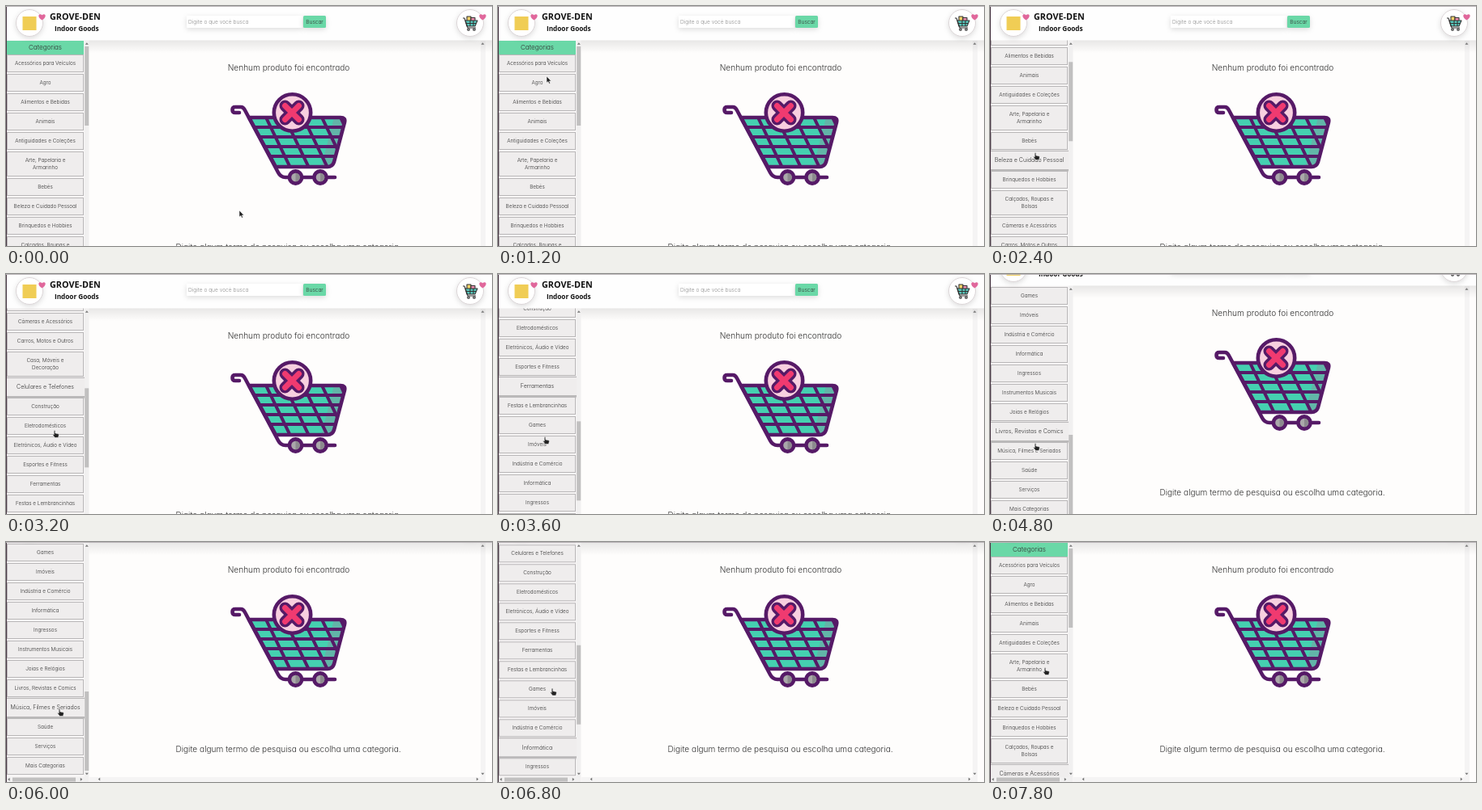
An HTML page that plays this animation: 600x297 px, repeating every 8000 ms.

```html
<!DOCTYPE html>
<html lang="pt-BR">
<head>
<meta charset="utf-8">
<title>Loja</title>
<style>
  html, body { margin: 0; width: 100%; height: 100%; overflow: hidden; background: #fefdfc; }
  svg { display: block; width: 600px; height: 297px; }
  text { font-family: Inter, "Open Sans", sans-serif; font-weight: 300; font-feature-settings: "cv11" 1; fill: #333; }
  .mid { text-anchor: middle; }
  .item text { font-size: 6.4px; }
  .item rect { fill: #efeded; stroke: #b9b7b8; }
  .item.hover rect { filter: drop-shadow(0 1px 1px #0005); }
  .brand { font-family: "Open Sans", "Noto Sans", sans-serif; font-weight: 700; fill: #111; }
  .track { fill: #f1f0f0; }
  .thumb { fill: #c1c0c0; }
  .arrow { fill: #777; }
  .ink { fill: none; stroke: #561a67; stroke-width: 4.6; stroke-linecap: round; stroke-linejoin: round; }
  #grid { stroke-width: 4; }
  .soft { filter: drop-shadow(0 2px 3px #0002); }
</style>
</head>
<body>
<svg viewBox="0 0 600 297" xmlns="http://www.w3.org/2000/svg">
  <defs>
    <path id="basket" d="M300 138H413Q419.500 138 418 144L405 193Q403 199 397 199H333Z"/>
    <clipPath id="sideClip"><rect y="42" width="97" height="291"/></clipPath>
    <clipPath id="basketClip"><use href="#basket"/></clipPath>
    <linearGradient id="shade" x2="0" y2="1">
      <stop stop-color="#000" stop-opacity=".09"/><stop offset="1" stop-color="#000" stop-opacity="0"/>
    </linearGradient>
    <path id="heart" d="M0 4.500C-7 0-4-5 0-1.800C4-5 7 0 0 4.500Z" fill="#e0679b"/>
    <g id="badge">
      <circle r="16.500" fill="#fff" stroke="#dcd6d8" class="soft"/>
      <use href="#heart" x="15.500" y="-8"/>
    </g>
    <path id="tri" class="arrow" d="M-2 1.200L0-1.300L2 1.200Z"/>
    <path id="cross" d="M344.500 123.500L361.500 140.500M361.500 123.500L344.500 140.500" fill="none" stroke-linecap="round"/>
  </defs>
  <rect width="600" height="297" fill="#fefdfc"/>
  <g id="page">
    <rect x="586" y="43" width="6" height="296" fill="#f5f4f4"/>
    <rect x="103" y="333" width="489" height="6" fill="#f5f4f4"/>
    <rect x="97" y="42" width="503" height="16" fill="url(#shade)"/>
    <use href="#tri" x="588.500" y="46.500"/>
    <use href="#tri" transform="translate(588.500 329) rotate(180)"/>
    <use href="#tri" transform="translate(115 335.500) rotate(-90)"/>
    <use href="#tri" transform="translate(582 335.500) rotate(90)"/>

    <text class="mid" x="349" y="79.500" font-size="10.100">Nenhum produto foi encontrado</text>
    <text class="mid" x="348.500" y="302" font-size="10.100">Digite algum termo de pesquisa ou escolha uma categoria.</text>

    <g id="cart">
      <use href="#basket" fill="#45d0b0"/>
      <g clip-path="url(#basketClip)">
        <path d="M405 138H420V200H389Z" fill="#62b5a8"/>
        <path id="grid" class="ink"/>
      </g>
      <use href="#basket" class="ink"/>
      <path class="ink" d="M288 132H283Q279.500 132 279.500 128.500T283 125H290Q293 125 295 129L336 206Q339 212 345 212H406"/>
      <g id="wheels"></g>
      <circle cx="353.500" cy="132" r="22.700" class="ink" style="fill:#f8cfdf"/>
      <use href="#cross" stroke="#561a67" stroke-width="14"/>
      <use href="#cross" stroke="#f03a70" stroke-width="7"/>
    </g>

    <rect width="97" y="42" height="297" fill="#f7f5f5"/>
    <g clip-path="url(#sideClip)"><g id="list">
      <rect x="1" y="43" width="95" height="17" fill="#6ad8a7"/>
      <text class="mid" x="48.500" y="54" font-size="8">Categorias</text>
    </g></g>
    <rect class="track" x="97" y="42" width="5.500" height="291"/>
    <rect class="thumb" id="thumb" x="97.200" y="50" width="5" height="98"/>
    <use href="#tri" x="99.800" y="46.500"/>
    <use href="#tri" transform="translate(99.800 329) rotate(180)"/>
    <rect class="track" y="333" width="102.500" height="6"/>
    <rect class="thumb" x="8" y="333.500" width="78" height="5"/>
    <use href="#tri" transform="translate(3.500 335.800) rotate(-90)"/>
    <use href="#tri" transform="translate(93 335.800) rotate(90)"/>

    <rect width="600" height="42.500" fill="#fefefe"/>
    <use href="#badge" x="29" y="21"/>
    <rect x="20.500" y="13" width="17" height="17" fill="#f0cd55"/>
    <text class="brand" x="54" y="17.300" font-size="10.800">GROVE-DEN</text>
    <text class="brand" x="60" y="30.700" font-size="8.200">Indoor Goods</text>
    <rect class="soft" x="223" y="12" width="143" height="15" rx="1" fill="#fff"/>
    <text x="225" y="22" font-size="6.600" style="fill:#8d8d8d">Digite o que você busca</text>
    <rect class="soft" x="367" y="12" width="28" height="15" rx="1.500" fill="#6ad8a7"/>
    <text class="mid" x="381" y="21.800" font-size="6.500">Buscar</text>
    <use href="#badge" x="573" y="21"/>
    <g fill="none" stroke="#333" stroke-width="1.100" stroke-linejoin="round">
      <path d="M569 18V13H574V18" fill="#f3d36a"/>
      <path d="M574 18V14.500H579V18" fill="#ee8fb0"/>
      <path d="M567 18H582L579 25H569Z" fill="#58c9bd"/>
      <path d="M564 15H566L570 27H580M568 21.500H580M573 18V25M577 18V25"/>
      <circle cx="571" cy="29" r="1.300" fill="#ddd"/><circle cx="578" cy="29" r="1.300" fill="#ddd"/>
    </g>
  </g>
  <rect width="600" height="1" fill="#b9b4b7"/>
  <rect y="1" width="1" height="296" fill="#4b3a47"/>
  <g id="pointer" stroke="#fff" stroke-width=".5" fill="#222">
    <path id="arrowShape" d="M0 0V8L1.900 6.400L3.200 9.200L4.500 8.600L3.300 5.900H5.700Z"/>
    <path id="handShape" d="M-.800 0Q0-.800 .800 0V3L4.500 3.800Q5.500 4 5.300 5.300L4.500 8.500H.300L-2.300 5Q-2.600 4-1.800 4L-.800 5Z"/>
  </g>
</svg>
<script>
(() => {
  const LOOP = 8000, STEP = 200, ROW_GAP = 2;
  const $ = id => document.getElementById(id);
  const make = (tag, attrs, parent, text = '') => {
    const el = document.createElementNS('http://www.w3.org/2000/svg', tag);
    for (const key in attrs) el.setAttribute(key, attrs[key]);
    el.textContent = text;
    return parent.appendChild(el);
  };

  // "|" breaks a label into two lines
  const labels = ['Acessórios para Veículos', 'Agro', 'Alimentos e Bebidas', 'Animais',
    'Antiguidades e Coleções', 'Arte, Papelaria e|Armarinho', 'Bebês', 'Beleza e Cuidado Pessoal',
    'Brinquedos e Hobbies', 'Calçados, Roupas e|Bolsas', 'Câmeras e Acessórios',
    'Carros, Motos e Outros', 'Casa, Móveis e|Decoração', 'Celulares e Telefones', 'Construção',
    'Eletrodomésticos', 'Eletrônicos, Áudio e Vídeo', 'Esportes e Fitness', 'Ferramentas',
    'Festas e Lembrancinhas', 'Games', 'Imóveis', 'Indústria e Comércio', 'Informática', 'Ingressos',
    'Instrumentos Musicais', 'Joias e Relógios', 'Livros, Revistas e Comics',
    'Música, Filmes e Seriados', 'Saúde', 'Serviços', 'Mais Categorias'];

  let rowTop = 60;
  const items = labels.map(label => {
    const lines = label.split('|'), height = lines.length > 1 ? 31 : 22;
    const y = rowTop + height / 2;
    const el = make('g', { class: 'item' }, $('list'));
    make('rect', { x: -47, y: -height / 2 + .5, width: 94, height: height - 1 }, el);
    lines.forEach((line, i) =>
      make('text', { class: 'mid', y: 2.1 + (i - (lines.length - 1) / 2) * 9.4 }, el, line));
    rowTop += height + ROW_GAP;
    return { el, y, half: height / 2 };
  });

  let mesh = '';
  for (let y = 150; y < 195; y += 12) mesh += `M300 ${y}H420`;
  for (let x = 321; x < 420; x += 23) mesh += `M${x} 138l30 62`;
  $('grid').setAttribute('d', mesh);

  for (const x of [357.5, 388]) {
    make('circle', { cx: x, cy: 212, r: 7.6, class: 'ink', style: 'fill:#aaa8aa' }, $('wheels'));
    make('path', { d: `M${x} 206.700a5.300 5.300 0 0 1 0 10.600z`, fill: '#8c8a8e' }, $('wheels'));
  }

  // Rows are [time, value...], joined by straight lines
  const scrollKeys = [[0, 0], [1200, 0], [2200, 57], [2400, 57], [3200, 270], [4000, 512],
    [4200, 512], [4400, 523], [6200, 523], [7600, 128], [7800, 0]];
  const pageKeys = [[0, 0], [4400, 0], [5000, 42]];
  const pointerKeys = [[0, 288, 253], [1200, 60, 87], [2200, 56, 182], [2400, 56, 182],
    [3200, 60, 194], [4000, 56, 210], [4800, 56, 210], [6000, 66, 207], [7600, 68, 156]];

  function sample(keys, t) {
    const next = keys.findIndex(key => key[0] > t);
    if (next < 0) return keys.at(-1).slice(1);
    const a = keys[next - 1], b = keys[next], k = (t - a[0]) / (b[0] - a[0]);
    return a.slice(1).map((v, i) => v + (b[i + 1] - v) * k);
  }

  // The hover state trails the picture by one step
  function itemUnderPointer(t) {
    const [x, y] = sample(pointerKeys, t);
    if (x > 96) return;
    const listY = y + sample(scrollKeys, t)[0] + sample(pageKeys, t)[0];
    return items.find(item => Math.abs(item.y - listY) <= item.half + ROW_GAP / 2);
  }

  function draw(t) {
    const [scroll] = sample(scrollKeys, t), [page] = sample(pageKeys, t);
    const [x, y] = sample(pointerKeys, t);
    const hovered = itemUnderPointer(Math.max(0, t - STEP));
    $('page').setAttribute('transform', `translate(0 ${-page})`);
    $('list').setAttribute('transform', `translate(0 ${-scroll})`);
    $('thumb').setAttribute('y', 50 + scroll * 177 / 523);
    for (const item of items) {
      const on = item === hovered;
      item.el.setAttribute('transform', `translate(48.5 ${item.y}) scale(${on ? 1.1 : 1})`);
      item.el.classList.toggle('hover', on);
    }
    $('pointer').setAttribute('transform', `translate(${x} ${y})`);
    $('arrowShape').style.display = hovered ? 'none' : '';
    $('handShape').style.display = hovered ? '' : 'none';
  }

  const start = performance.now();
  function tick() {
    const t = (performance.now() - start) % LOOP;
    draw(Math.floor(t / STEP) * STEP);
    requestAnimationFrame(tick);
  }
  tick();
})();
</script>
</body>
</html>
```
